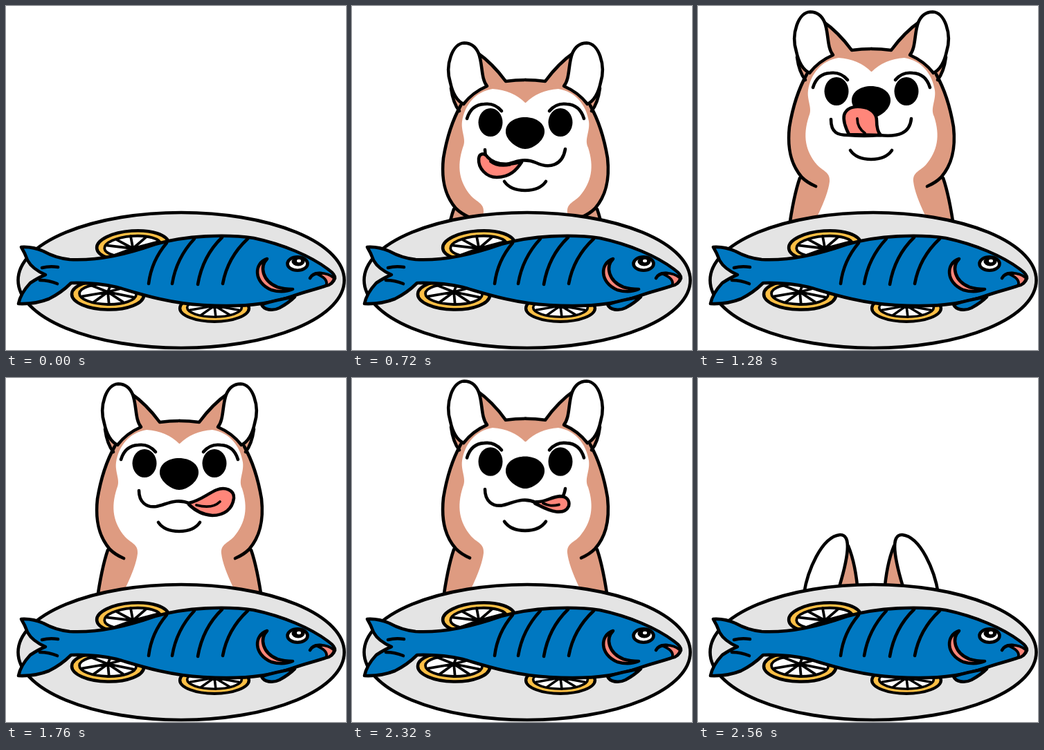
Animation of 491 by 498 pixels, one loop 2.64 s. Source, as an HTML page:

```html
<!DOCTYPE html>
<html lang="en">
<head>
<meta charset="utf-8">
<title>Dog and fish</title>
<style>
html, body { margin: 0; width: 100%; height: 100%; overflow: hidden; background: #fff; }
svg { display: block; width: 100%; height: 100%; }
.ln { fill: none; stroke: #000; stroke-width: 4.6; stroke-linecap: round; stroke-linejoin: round; }
.thin { stroke-width: 3.8; }
.brown { fill: #de9b81; }
.white { fill: #fff; }
.pink { fill: #ff867a; }
.blue { fill: #0078c1; }
.grey { fill: #e4e4e4; }
.lemon { fill: #fdbf45; }

#dog, #ears, #tongue, #fold, #mouth { animation: 2640ms infinite step-end; }
#dog { animation-name: bob; transform-origin: 250.5px 310px; }
#ears { animation-name: duck; }
#tongue { animation-name: lick; }
#fold { animation-name: fold; }
#mouth { animation-name: mouth; }

/* one drawing lasts 80 ms, 1/33 of the loop */
@keyframes bob {
  0% { transform: translateY(400px); }
  21.21% { transform: translateY(272px) scaleX(1.04); }
  24.24% { transform: translateY(145px) scaleX(1.02); }
  27.27% { transform: translateY(45px); }
  30.3% { transform: scaleY(1.015); }
  33.33% { transform: scaleY(1.006); }
  39.39% { transform: scaleY(1.004); }
  42.42% { transform: none; }
  72.72% { transform: scaleY(1.002); }
  78.78% { transform: scaleY(1.006); }
  84.84% { transform: scaleY(1.01); }
  87.87% { transform: scaleY(1.013); }
  90.9% { transform: scaleY(1.016); }
  93.93% { transform: translateY(105px) scale(.86, 1.03); }
  96.96%, 100% { transform: translateY(400px); }
}
@keyframes duck {
  0% { visibility: hidden; }
  96.96%, 100% { visibility: visible; }
}
@keyframes lick {
  0%, 36.36% {
    d: path("M245 181 C238 192 228 203 209 203 C194 203 182 190 183 176 C184 168 191 167 196 174 C205 184 222 186 243 181 Z");
    animation-timing-function: steps(4);
  }
  48.48% {
    d: path("M218 186 C214 178 209 167 211 158 C214 148 224 145 235 146 C250 147 258 156 258 166 C258 176 260 183 264 187 Z");
    animation-timing-function: steps(4);
  }
  60.6%, 69.69% {
    d: path("M264 181 C280 178 290 168 304 162 C316 157 330 162 329 174 C327 190 315 199 298 199 C284 198 274 193 264 183 Z");
    animation-timing-function: steps(6);
  }
  87.87%, 100% {
    d: path("M266 181 C277 182 288 174 300 173 C310 173 315 179 313 187 C310 194 304 196 295 195 C284 194 274 188 264 183 Z");
  }
}
@keyframes fold {
  0%, 36.36% { d: path("M200 180 C207 186 216 187 228 185"); animation-timing-function: steps(4); }
  48.48% { d: path("M230 163 C230 171 234 179 241 184"); animation-timing-function: steps(4); }
  60.6%, 69.69% { d: path("M275 184 C290 188 302 186 309 179"); animation-timing-function: steps(6); }
  87.87%, 100% { d: path("M276 183 C284 187 290 187 299 185"); }
}
@keyframes mouth {
  0%, 36.36% {
    d: path("M192 163 C192 180 203 188 217 186 C232 183 246 173 266 182 C285 191 304 186 308 162");
    animation-timing-function: steps(4);
  }
  48.48% {
    d: path("M192 164 C192 184 202 187 217 187 C230 188 250 188 262 187 C290 190 306 184 308 163");
    animation-timing-function: steps(4);
  }
  60.6%, 100% {
    d: path("M192 163 C192 180 203 188 217 186 C232 183 246 173 266 182 C285 191 304 186 308 162");
  }
}
</style>
</head>
<body>
<svg viewBox="0 0 491 498">
  <defs>
    <clipPath id="above"><path d="M0 0H491V385H0Z"/></clipPath>

    <g id="back">
      <path class="brown" d="M143 74 Q146 96 155 107 L222 64 Q207 40 180 22 Z"/>
      <path class="brown" d="M252 63 Q236 62 221 65 L193 70 L157 99 C144 122 137 145 132 175 C128 212 137 233 148 249 Q138 280 131 330 H252 Z"/>
      <path class="ln" d="M143 74 Q146 96 155 107 M180 22 Q203 38 222 64 Q236 62 251 62"/>
      <path class="ln" d="M157 99 C144 122 137 145 132 175 C128 212 137 233 150 248 Q158 256 170 261 M147 249 Q138 275 131 325"/>
      <path class="ln white" d="M195 71 C186 60 189 40 183 24 C178 12 170 8.5 162 8.5 C145 9 134 40 142 66 C145 80 151 92 161 97 Q174 80 195 71 Z"/>
    </g>
    <g id="front">
      <path class="white" d="M252 95 H250 Q232 77 203 75 C178 79 163 98 159 122 C157 137 166 148 160 160 C151 188 155 210 172 230 C180 239 191 240 190 254 Q188 272 172 305 V330 H252 Z"/>
      <path class="ln" d="M166 118 Q172 98 191 97 Q206 95 216 107"/>
      <ellipse cx="200" cy="123.5" rx="17.5" ry="20.5"/>
    </g>
    <g id="ear">
      <path class="ln brown" d="M217 243 Q228 270 231 312 H200 Z"/>
      <path class="ln white" d="M153 312 C158 280 178 230 205 227 C222 226 218 258 201 312 Z"/>
    </g>
    <g id="slice">
      <ellipse class="ln lemon" rx="52" ry="21.5"/>
      <ellipse class="ln thin white" cy="1" rx="41" ry="15"/>
      <path class="ln thin" d="M-37 -3 L0 4 L-22 -10 M-2 -14 L0 4 L20 -11 M37 -3 L0 4 L24 13 M-4 15 L0 4 L-28 12"/>
    </g>
  </defs>

  <g clip-path="url(#above)">
    <g id="dog">
      <use href="#back"/>
      <use href="#back" transform="translate(501) scale(-1 1)"/>
      <use href="#front"/>
      <use href="#front" transform="translate(501) scale(-1 1)"/>
      <path d="M222 138 C221 124 235 116 250 116 C266 116 279 125 278 138 C277 150 262 162 250 162 C239 162 223 150 222 138 Z"/>
      <path class="ln" d="M220 209 Q229 222 250 222 Q271 222 280 209"/>
      <path id="mouth" class="ln" d="M192 163 C192 180 203 188 217 186 C232 183 246 173 266 182 C285 191 304 186 308 162"/>
      <path id="tongue" class="ln pink" d="M245 181 C238 192 228 203 209 203 C194 203 182 190 183 176 C184 168 191 167 196 174 C205 184 222 186 243 181 Z"/>
      <path id="fold" class="ln thin" d="M200 180 C207 186 216 187 228 185"/>
    </g>
    <g id="ears">
      <use href="#ear"/>
      <use href="#ear" transform="translate(500) scale(-1 1)"/>
    </g>
  </g>

  <ellipse class="ln grey" cx="253" cy="397" rx="235.5" ry="98"/>
  <use href="#slice" transform="translate(183 347) rotate(-4)"/>
  <use href="#slice" transform="translate(147 418) rotate(181)"/>
  <use href="#slice" transform="translate(301 437.5) rotate(180) scale(.96 .9)"/>

  <g id="fish">
    <path class="ln blue" d="M22 349 Q38 348 54 355 Q72 365 92 367 C135 369 175 359 215 345 C260 332 318 330 358 336 C400 345 440 362 465 381 Q476 389 475 394 Q472 403 462 405 C448 410 430 414 414 420 C375 434 330 436 285 433 C230 430 185 414 160 407 Q130 400 94 401 Q80 415 62 424 Q42 432 18 431 Q21 416 35 401 Q47 393 57 389 Q38 381 31 368 Q27 357 22 349 Z"/>
    <path class="ln blue" d="M369 432 C372 440 385 442 395 437 Q408 430 417 421 Q392 425 369 432 Z"/>
    <path class="ln" d="M52 379 Q63 376 75 378 M49 397 Q62 397 74 402"/>
    <path class="ln" d="M232 343 Q210 369 206 402 M272 337 Q246 365 240 402 M312 335 Q284 362 277 403 M349 337 Q320 364 313 402"/>
    <path class="ln pink" d="M377 366 C358 372 357 400 383 411 Q400 416 414 410 Q402 410 392 407 C370 398 366 377 377 366 Z"/>
    <ellipse class="ln white" cx="421" cy="373" rx="14.5" ry="9.8"/>
    <ellipse cx="422" cy="370" rx="9.5" ry="6.5"/>
    <ellipse class="white" cx="423" cy="369" rx="3" ry="2.2"/>
    <path class="ln thin pink" d="M447 387 Q464 385 474 394 Q471 403 462 405 Q467 395 447 387 Z"/>
    <path class="ln" d="M439 394 Q443 386 456 387"/>
  </g>
</svg>
</body>
</html>
```
